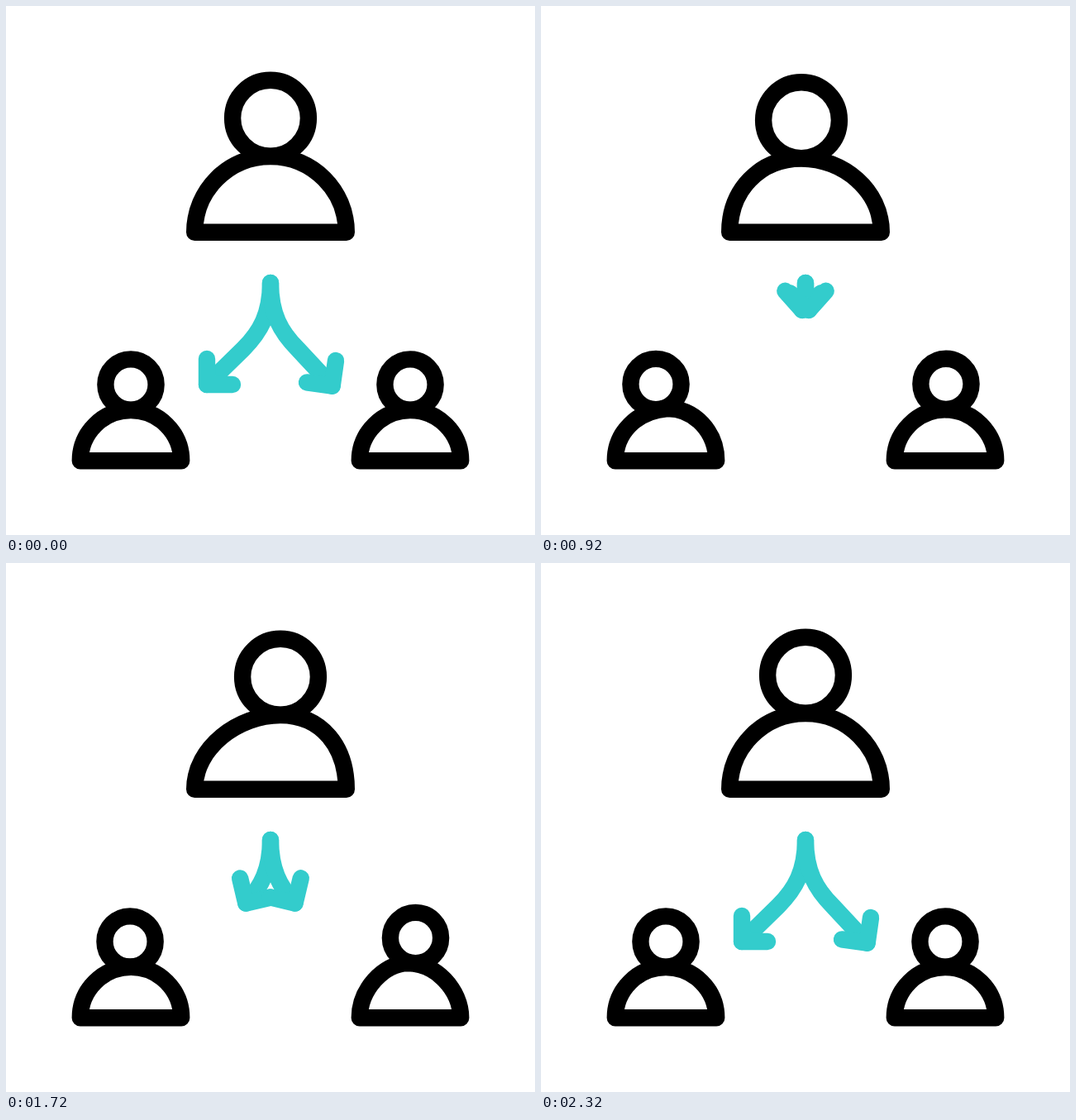
Write an HTML page that moves like this. It is 640 px wide and 640 px high and loops after 2400 ms.

```html
<!DOCTYPE html>
<html lang="en">
<head>
<meta charset="utf-8">
<title>Delegation</title>
<style>
  html, body { margin: 0; width: 100%; height: 100%; overflow: hidden; background: #fff; }
  svg { display: block; width: 100%; height: 100%; }
  g { fill: none; stroke-width: 20.4; stroke-linecap: round; stroke-linejoin: round; }
  #people { stroke: #000; }
  #arrows { stroke: #33cccc; }
</style>
</head>
<body>
<svg viewBox="0 0 640 640">
  <g id="arrows"></g>
  <g id="people"></g>
</svg>
<script>
const LOOP = 2400;
const $ = id => document.getElementById(id);

function add(parent, tag, attrs = {}) {
  const el = document.createElementNS('http://www.w3.org/2000/svg', tag);
  for (const k in attrs) el.setAttribute(k, attrs[k]);
  return parent.appendChild(el);
}

// eased 0..1 between two times
function ease(t, from, to) {
  const s = Math.min(1, Math.max(0, (t - from) / (to - from)));
  return s * s * (3 - 2 * s);
}

// x, y: top of the shoulders; r: shoulder radius
function person(x, y, r) {
  const head = add($('people'), 'circle', { r: r / 2 });
  const body = add($('people'), 'path');
  const k = r * 0.5523, base = y + r;
  // shifts of the head, the shoulder top and its left handle
  return ([hx, hy], [tx, ty], [lx, ly] = [0, 0]) => {
    const ax = x + tx, ay = y + ty;
    head.setAttribute('cx', x + hx);
    head.setAttribute('cy', y - r / 2 - 0.4 + hy);
    body.setAttribute('d',
      `M${x - r},${base} C${x - r},${base - k} ${ax - k + lx},${ay + ly} ${ax},${ay}` +
      ` C${ax + k},${ay} ${x + r},${base - k} ${x + r},${base} Z`);
  };
}

// side: 1 points left, -1 points right; tilt: turn of the head at full length
function arrow(side, endX, endY, tilt) {
  const at = (dx, y) => `${320 - side * dx},${y}`;
  const shaft = add($('arrows'), 'path', {
    d: `M${at(0, 335)} C${at(0, 372)} ${at(12, 394)} ${at(33, 415)} L${endX},${endY}`
  });
  const tip = add($('arrows'), 'path', { d: `M0,-31 V0 H${31 * side}` });
  const full = shaft.getTotalLength();
  return u => {
    const len = full + (29 - full) * u;
    const p = shaft.getPointAtLength(len);
    const turn = Math.max(tilt, 45 * u * u);
    shaft.setAttribute('stroke-dasharray', `${len} 999`);
    tip.setAttribute('transform', `translate(${p.x} ${p.y}) rotate(${-turn * side})`);
  };
}

const boss = person(320, 182, 91.8);
const leftMan = person(151, 489, 61.2);
const rightMan = person(489, 489, 61.2);
const leftArrow = arrow(1, 243, 458, 0);
const rightArrow = arrow(-1, 394.7, 459.7, 8);

function draw(t) {
  const lean = ease(t, 0, 540), swing = ease(t, 960, 1360), rest = 1 - ease(t, 1780, 2320);
  const shift = [(-5 * lean + 17 * swing) * rest, (2.5 * lean - .5 * swing) * rest];
  boss(shift, shift);

  const l = lean - ease(t, 1340, 1800);
  leftMan([-12 * l, -.5 * l], [2 * l, -2 * l], [-4 * l, 3 * l]);

  const r = ease(t, 790, 1330) * rest;
  rightMan([6.5 * r, -4.5 * r], [-3 * r, -5 * r], [4 * r, r]);

  const u = ease(t, 130, 1020) - ease(t, 1295, 2200);
  leftArrow(u);
  rightArrow(u);
}

const start = performance.now();
function tick() {
  draw((performance.now() - start) % LOOP);
  requestAnimationFrame(tick);
}
tick();
</script>
</body>
</html>
```
